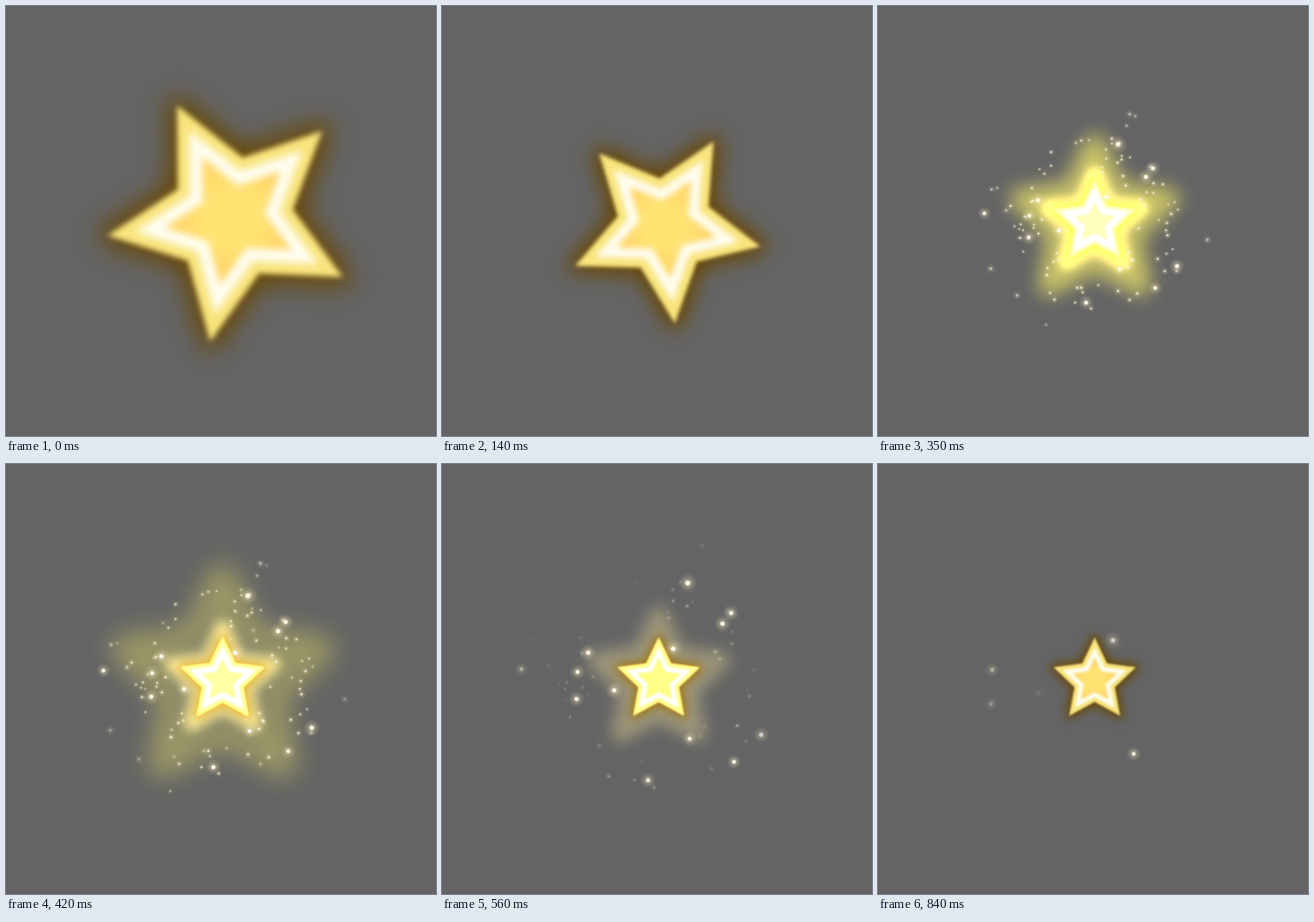
Write an HTML page that moves like this. It is 512 px wide and 512 px high and loops after 0.91 s.

```html
<!DOCTYPE html>
<html lang="en">
<head>
<meta charset="utf-8">
<title>Star burst</title>
<style>
html, body { margin: 0; width: 100%; height: 100%; overflow: hidden; background: #646464; }
svg { display: block; width: 100%; height: 100%; }
#flare { mix-blend-mode: plus-lighter; }
</style>
</head>
<body>
<svg viewBox="0 0 512 512">
  <defs>
    <radialGradient id="spark">
      <stop offset="0" stop-color="#fff"/>
      <stop offset=".16" stop-color="#fffbe8"/>
      <stop offset=".32" stop-color="#fff0c8" stop-opacity=".36"/>
      <stop offset=".6" stop-color="#ffeec4" stop-opacity=".15"/>
      <stop offset="1" stop-color="#ffeec4" stop-opacity="0"/>
    </radialGradient>
    <radialGradient id="core" gradientUnits="userSpaceOnUse" cx="0" cy="0" r="50">
      <stop offset=".4" stop-color="#ffe474"/>
      <stop offset=".9" stop-color="#ffd568"/>
    </radialGradient>
  </defs>
  <rect width="512" height="512" fill="#646464"/>
  <g id="wave"></g>
  <g id="star"></g>
  <g id="flare"></g>
  <g id="sparks"></g>
</svg>
<script>
const NS = 'http://www.w3.org/2000/svg';
const STEP = 70, STEPS = 13, MID = 258, BURST = 5;
const $ = id => document.getElementById(id);
const clamp = (v, low, high) => Math.min(high, Math.max(low, v));

function add(parent, tag, attrs) {
  const el = document.createElementNS(NS, tag);
  for (const name in attrs) el.setAttribute(name, attrs[name]);
  return parent.appendChild(el);
}

function starPath(r) {
  const pts = [];
  for (let i = 0; i < 10; i++) {
    const a = i * Math.PI / 5, d = i % 2 ? r * 0.49 : r;
    pts.push((d * Math.sin(a)).toFixed(2) + ' ' + (-d * Math.cos(a)).toFixed(2));
  }
  return 'M' + pts.join('L') + 'Z';
}

// Blurred star, drawn in units where the outer radius is 100
function layer(parent, r, soft, fill, stroke = 'none', width = 0) {
  const id = parent.id + r + 'w' + width;
  const f = add(document.querySelector('defs'), 'filter', {
    id, filterUnits: 'userSpaceOnUse', x: -200, y: -200, width: 400, height: 400,
    'color-interpolation-filters': 'sRGB'
  });
  add(f, 'feGaussianBlur', { stdDeviation: soft });
  add(parent, 'path', {
    d: starPath(r), fill, stroke, 'stroke-width': width,
    'stroke-linejoin': 'round', filter: `url(#${id})`
  });
}

const star = $('star'), wave = $('wave'), flare = $('flare');
layer(star, 100, 10, '#684600', '#684600', 14);
layer(star, 100, 2, '#f8e47c');
layer(star, 78, 3.2, '#fffdf0');
layer(star, 54, 3, 'url(#core)');
layer(wave, 100, 12, 'none', '#ece46a', 28);
layer(flare, 100, 11, 'rgb(200,175,75)', 'rgb(200,175,75)', 26);

let seed = 11;
function rnd() {
  seed = (seed * 16807) % 2147483647;
  return seed / 2147483647;
}

const sparks = [];
function spark(x, y, r, glow, end) {
  const el = add($('sparks'), 'circle', { fill: 'url(#spark)' });
  const born = Math.hypot(x, y) > 95 ? 3 : 4;
  sparks.push({ el, x, y, r, glow, born, end });
}

function scatter(count, near, far, size, glow, end) {
  for (let i = 0; i < count; i++) {
    const a = rnd() * Math.PI * 2, d = near + (far - near) * Math.sqrt(rnd());
    spark(d * Math.cos(a), d * Math.sin(a), size * (0.7 + 0.6 * rnd()), glow, end + rnd() * 2);
  }
}

// The brightest sparks, in the order they go out
const bright = [
  [116, 246], [364, 314], [247, 361], [336, 342], [288, 157], [333, 188], [324, 199],
  [185, 229], [212, 268], [173, 277], [174, 249], [273, 225], [290, 318]
];
bright.forEach(([x, y], i) => spark(x - MID, y - MID, 8 + 3 * rnd(), 1, 9 + 0.4 * i));
scatter(14, 100, 148, 5, 0.55, 6.5);
scatter(75, 45, 112, 4, 0.8, 7);

function place(el, x, y, r, turn = 0) {
  el.setAttribute('transform', `translate(${x} ${y}) rotate(${turn}) scale(${r / 100})`);
}

function pulse(el, age, radius, growth, peak, decay, life) {
  place(el, MID, MID, Math.max(1, radius + growth * age));
  const on = age >= -1 && age < life;
  el.setAttribute('opacity', on ? peak * Math.min(1, decay ** age) : 0);
}

function draw(time) {
  const k = Math.floor(time / STEP) % STEPS;
  const age = k - BURST;

  // The star spins about a point beside its centre while it shrinks
  const size = clamp(163 - 25 * k, 50, 145);
  const turn = age < 0 ? 28 * k - 26 : 0;
  const arm = 0.13 * (size - 50), a = turn * Math.PI / 180;
  place(star, MID + arm * Math.cos(a), MID + arm * Math.sin(a), size * 1.03, turn);

  pulse(wave, age, 92, 30, 0.75, 0.55, 3);
  pulse(flare, age, 57, 7, 1, 0.65, 6);

  const spread = 1 + 0.0753 * (k - 6);
  for (const s of sparks) {
    const on = k >= s.born && k < s.end;
    const fade = on ? Math.min(1, (s.end - k) / 2) * (k === s.born ? 0.75 : 1) : 0;
    s.el.setAttribute('cx', MID + s.x * spread);
    s.el.setAttribute('cy', MID + s.y * spread);
    s.el.setAttribute('r', s.r * clamp(0.75 + 0.15 * (k - 3), 0.75, 1.1));
    s.el.setAttribute('opacity', fade * s.glow);
  }
}

const start = performance.now();
function tick(now) {
  draw(Math.max(0, now - start));
  requestAnimationFrame(tick);
}
draw(0);
requestAnimationFrame(tick);
</script>
</body>
</html>
```
